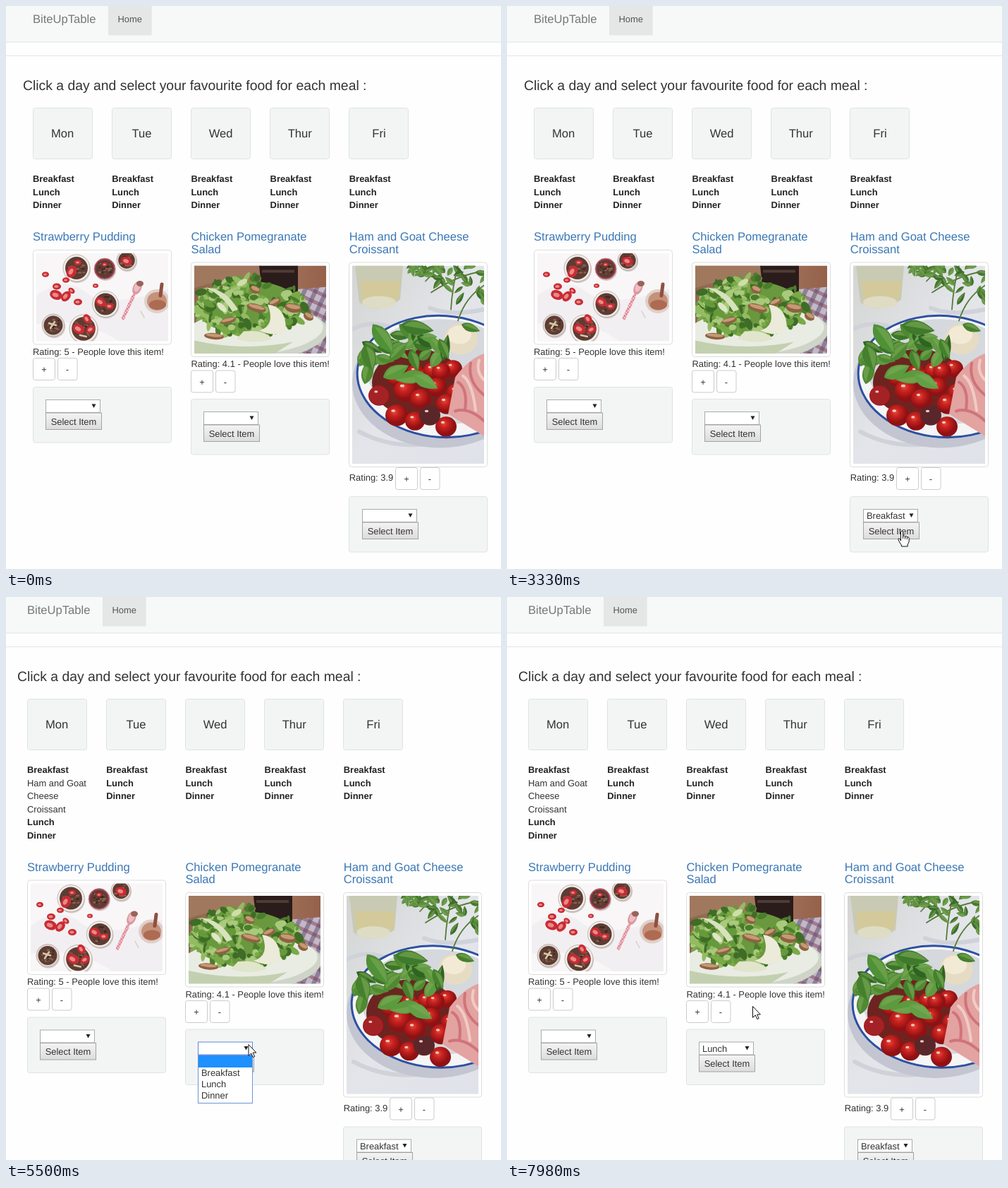
An HTML page that plays this animation: 702 by 797 pixels, repeating every 8000 ms.

```html
<!DOCTYPE html>
<html lang="en">
<head>
<meta charset="utf-8">
<title>Meal planner</title>
<style>
html, body { margin: 0; width: 100%; height: 100%; overflow: hidden; background: #fefefe; }
svg { display: block; width: 702px; height: 797px; }
text { font: 12.92px "Liberation Sans", Arial, sans-serif; fill: #333; text-rendering: geometricPrecision; }
.b { font-weight: bold; fill: #222; }
.h { font-size: 16.6px; }
.link { fill: #3b78b5; }
.mid { text-anchor: middle; }
.well { fill: #f3f5f5; stroke: #dfe3e3; }
.box { fill: #fff; stroke: #ccc; }
.frame { fill: #fff; stroke: #ddd; }
</style>
</head>
<body>
<svg id="stage" viewBox="0 0 702 797" xmlns="http://www.w3.org/2000/svg">
  <defs>
    <filter id="soft" x="0" y="0" width="1" height="1"><feGaussianBlur stdDeviation=".7"/></filter>
    <linearGradient id="btn" x2="0" y2="1"><stop stop-color="#f4f4f4"/><stop offset="1" stop-color="#dcdcdc"/></linearGradient>
    <linearGradient id="marble" x2="1" y2="1"><stop stop-color="#d3d4d2"/><stop offset=".5" stop-color="#e4e5ea"/><stop offset="1" stop-color="#e0e2ea"/></linearGradient>
    <linearGradient id="wood" x2="1"><stop stop-color="#8d6650"/><stop offset=".5" stop-color="#a87c62"/><stop offset="1" stop-color="#94604a"/></linearGradient>
    <radialGradient id="tomato" cx=".4" cy=".35"><stop stop-color="#e24a3a"/><stop offset=".4" stop-color="#c9221f"/><stop offset="1" stop-color="#8f1113"/></radialGradient>
    <pattern id="check" width="5" height="5" patternUnits="userSpaceOnUse"><path d="M0 0H5V5H0Z" fill="#f3c6cc"/><path d="M0 0H2.5V2.5H0ZM2.5 2.5H5V5H2.5Z" fill="#dd7d8b"/></pattern>
    <pattern id="plaid" width="14" height="14" patternUnits="userSpaceOnUse" patternTransform="rotate(25)"><path d="M0 0H14V14H0Z" fill="#c3b8c5"/><path d="M0 0H6V14H0Z" fill="#67587a" opacity=".6"/><path d="M0 0H14V5H0Z" fill="#7a3f58" opacity=".5"/></pattern>
  </defs>
  <g id="page"></g>
  <g id="pop"></g>
  <g id="arrow"><path d="M.5 .5V16.4L4.2 12.9L6.8 18.6L9.2 17.5L6.6 12H11.4Z" fill="#fff" stroke="#111"/></g>
  <g id="hand"><path d="M-1.5 14V1.6Q-1.5 .5 0 .5T1.6 1.6V7.2Q3.6 6.2 4.4 7.8Q6.4 7 7.2 8.7Q10 8 10.2 10.6V15Q9.6 17.6 8.2 19V22H-.6V20Q-3.2 17.4-4.9 12.8Q-5.4 10.8-4 10.6Q-2.6 11-1.5 14Z" fill="#fff" stroke="#111"/><path d="M1.6 7V11M4.5 8V11.5M7.3 9V12" stroke="#111"/></g>
</svg>
<script>
const $ = id => document.getElementById(id);
const LOOP = 8000, SHIFT = 3410, DX = -8, DY = 55.5;
const COL = 112.2, MEALS = ['', 'Breakfast', 'Lunch', 'Dinner'];

const text = (x, y, s, c = '') => `<text x="${x}" y="${y}" class="${c}">${s}</text>`;
const rect = (x, y, w, h, c, r = 0) => `<rect x="${x}" y="${y}" width="${w}" height="${h}" rx="${r}" class="${c}"/>`;
const fill = (x, y, w, h, f) => `<rect x="${x}" y="${y}" width="${w}" height="${h}" fill="${f}"/>`;
const oval = (x, y, rx, ry, f, a = 0, more = '') =>
  `<ellipse cx="${x}" cy="${y}" rx="${rx}" ry="${ry}" fill="${f}" transform="rotate(${a} ${x} ${y})" ${more}/>`;
const path = (d, f, more = '') => `<path d="${d}" fill="${f}" ${more}/>`;
const line = (d, c, w) => path(d, 'none', `stroke="${c}" stroke-width="${w}" stroke-linecap="round"`);

function random(seed) {
  return (a = 0, b = 1) => {
    seed = (seed * 16807) % 2147483647;
    return a + (b - a) * seed / 2147483647;
  };
}
const pick = (r, list) => list[Math.floor(r(0, list.length))];

function berry(x, y, r, a = 0) {
  return oval(x, y, r, r * .75, '#c92b34', a) + oval(x - r * .1, y, r * .5, r * .32, '#e88a84', a);
}

function pudding() {
  const r = random(11);
  const bowl = (x, y, R, rim) => {
    let s = oval(x + 1, y + 2, R, R, '#cfc7c6') + oval(x, y, R, R, rim, 0, 'stroke="#b5a59f" stroke-width=".8"');
    s += oval(x, y, R * .84, R * .84, '#5c3c33');
    for (let i = 0; i < 18; i++)
      s += oval(x + r(-.55, .55) * R, y + r(-.55, .55) * R, r(1, 3), 1.3, pick(r, ['#8c6350', '#40261f', '#74503f']));
    return s;
  };
  let s = fill(0, 0, 188, 127, '#f8f6f7');
  s += path('M0 60Q40 30 70 55T188 50V127H120Q70 90 0 100Z', '#f2eff2');
  s += bowl(57, 21, 19, '#f3ede9') + bowl(97, 22, 15, '#a83a4d') + bowl(128, 10, 14, '#e9dfd9');
  s += bowl(98, 72, 18.5, '#f3ede9') + bowl(24, 102, 16, '#e2d9d2') + bowl(67, 107, 20, '#f3ede9');
  s += berry(50, 26, 9, -60) + berry(128, 11, 8, 20) + berry(59, 13, 5) + berry(97, 16, 4);
  s += berry(91, 69, 8, 30) + berry(104, 75, 6) + berry(72, 93, 7, 60) + berry(60, 107, 9, 30) + berry(77, 108, 7, -30);
  s += berry(28, 59, 9, 20) + berry(42, 61, 8, -50) + berry(29, 47, 6) + berry(42, 38, 5) + berry(13, 30, 5);
  s += berry(59, 69, 6) + berry(84, 46, 4) + berry(50, 53, 5, 40);
  s += line('M18 99L28 102M20 106L26 97M62 116L71 118', '#d5c6a8', 2.5);
  s += line('M138 60L123 92', 'url(#check)', 4.5) + oval(143, 49, 6, 10, '#dd97a0', 24) + oval(143, 48, 4, 7, '#edbdc2', 24);
  s += oval(147, 43, 5, 4, '#98635a');
  s += oval(171, 68, 18, 17, '#dfd0cb') + oval(171, 68, 14, 13, '#c6917a') + oval(172, 73, 12, 7, '#ad6b51');
  s += line('M176 60L178 44', '#8e5041', 5) + line('M148 82L153 91', '#d6cfc3', 1.5);
  return s;
}

function salad() {
  const r = random(29);
  let s = fill(0, 0, 189, 127, 'url(#wood)');
  s += path('M0 0H95V35Q60 10 0 32Z', '#a0785e');
  s += path('M140 34L189 30V127H120Z', 'url(#plaid)');
  s += path('M92 0H147V38Q120 50 96 38Z', '#2a1c1b') + path('M96 6H142V10H96Z', '#503b35');
  s += oval(85, 98, 104, 38, '#ced5c8', -4) + oval(85, 93, 98, 33, '#e9ece2', -4);
  s += path('M0 106Q70 122 140 108L110 127H0Z', '#c3d0b0');
  const greens = ['#4b7e2b', '#659a3b', '#7aaa48', '#94bb62', '#3f6c26', '#a9c97c'];
  s += oval(78, 60, 74, 38, '#6a983f');
  for (let i = 0; i < 240; i++) {
    const a = r(0, 6.28), d = Math.sqrt(r());
    s += oval(78 + 80 * d * Math.cos(a), 58 + 42 * d * Math.sin(a), r(3, 10), r(2, 5.5), pick(r, greens), r(0, 180));
  }
  const meat = (x, y, w, h, a) => `<g transform="translate(${x} ${y}) rotate(${a})">` +
    oval(0, 0, w / 2, h / 2, '#8f6143') + oval(0, -h * .15, w * .42, h * .25, '#c49a73') + '</g>';
  s += meat(86, 34, 15, 11, 25) + meat(88, 60, 28, 11, 15) + meat(140, 60, 24, 13, 10) + meat(114, 52, 18, 10, -25);
  s += meat(48, 78, 22, 9, -15) + meat(28, 100, 28, 9, 5) + meat(162, 72, 15, 11, 30);
  s += path('M104 55Q129 58 130 88Q122 104 92 92Q116 85 104 55Z', '#ecead8');
  s += path('M70 93Q100 90 110 104Q88 112 60 104Z', '#e1e5cc') + path('M16 31Q44 32 62 62L54 65Q40 42 16 31Z', '#d8e2bd');
  s += oval(39, 59, 9, 4, '#dfe6c6', 45) + oval(68, 24, 8, 4, '#cfddaa', -30);
  return s;
}

function platter() {
  const r = random(47);
  const leaf = (x, y, w, h, a, c = '#45802c') => `<g transform="translate(${x} ${y}) rotate(${a})">` +
    path(`M${-w} 0Q${-w * .3} ${-h * 1.7} ${w} 0Q${-w * .3} ${h * 1.7} ${-w} 0Z`, c) +
    path(`M${-w * .8} 0Q${-w * .2} ${-h * 1.4} ${w * .9} 0Z`, '#79a854', 'opacity=".65"') + '</g>';
  const tom = (x, y, R, c = 'url(#tomato)') => oval(x, y, R, R * .95, c) + oval(x - R * .3, y - R * .4, R * .18, R * .11, '#f6c8bd');
  let s = fill(0, 0, 188, 282, 'url(#marble)');
  s += line('M0 90Q30 75 60 90M110 60Q140 72 187 62M10 235Q60 262 120 250', '#d0d2da', 6);
  s += path('M4 0H72L68 48Q38 72 10 52Z', '#c9cab4') + path('M12 22H68L66 46Q38 64 14 48Z', '#d3c99a') + oval(38, 52, 24, 9, '#dedcc4');
  s += oval(124, 166, 124, 92, '#c3c6d1') + oval(128, 157, 121, 86, '#f5f5f6', 4, 'stroke="#2d50a3" stroke-width="3"');
  s += oval(130, 150, 110, 74, '#d5d8dc', 4) + oval(92, 166, 64, 48, '#6d2420');
  const red = [[62, 160, 12], [90, 152, 13], [102, 160, 14], [114, 149, 13], [143, 146, 13], [126, 150, 13], [120, 172, 14],
    [38, 184, 15], [76, 177, 17], [97, 189, 15], [63, 212, 16], [89, 220, 14], [148, 180, 14], [134, 196, 15], [133, 228, 15]];
  for (const t of red) s += tom(...t);
  s += tom(110, 212, 15, '#59272a') + tom(38, 184, 14, '#a32225');
  s += path('M146 158Q165 132 188 124V242Q165 228 136 210Q142 180 146 158Z', '#e2a3a1');
  s += line('M150 165Q164 174 160 204M168 138Q163 165 188 184M146 206Q165 200 187 220', '#cf747b', 4);
  s += line('M157 156Q170 165 175 205M180 134Q175 150 187 162', '#f1cbc5', 4);
  s += oval(154, 104, 24, 22, '#e6dcc4') + oval(152, 98, 17, 13, '#f3ead6');
  const basil = ['#3c7527', '#4f8a33', '#2f6323', '#5f9a41'];
  for (let i = 0; i < 26; i++) {
    const u = i / 25;
    s += leaf(22 + 106 * u + r(-7, 7), 138 - 34 * Math.sin(u * 2.8) + r(-16, 18), r(10, 20), r(6, 10), r(-80, 80), pick(r, basil));
  }
  s += leaf(44, 104, 26, 13, 55, '#4f9137') + leaf(24, 130, 20, 12, 75) + leaf(92, 88, 24, 12, 10, '#3f7a2c');
  s += leaf(62, 150, 20, 11, -25, '#5c9a3e') + leaf(82, 158, 22, 11, 170, '#5c9a3e') + leaf(104, 164, 20, 11, 30, '#62a045') + leaf(88, 134, 16, 9, 70);
  s += leaf(168, 88, 14, 7, 20) + leaf(130, 118, 16, 8, 65);
  s += line('M187 8Q152 12 112 38M150 0Q142 30 140 62M187 28Q160 45 150 78M125 0L104 22', '#557c37', 1.8);
  for (let i = 0; i < 44; i++) {
    const x = r(82, 188), y = r(-4, 12 + (x - 82) * .5);
    s += leaf(x, y, r(6, 11), r(3, 5), r(0, 360), pick(r, ['#48792e', '#5f9140', '#3c6d2a']));
  }
  return s;
}

const plusMinus = (x, y) => rect(x, y, 31, 31, 'box', 3) + text(x + 15.5, y + 20.5, '+', 'mid') +
  rect(x + 35, y, 27.5, 31, 'box', 3) + text(x + 48.5, y + 20.5, '-', 'mid');

// Select position for each card, before the layout shift
const selects = [[56.5, 557.5], [280.5, 574.5], [505.5, 712.5]];

function card(n, title, photo, h, rating) {
  const x = 38 + n * 2 * COL, left = Math.floor(x) + .5, y = 332 + 17.5 * (title.length - 1);
  const [sx, sy] = selects[n], bottom = y + 13.5 + h;
  let s = title.map((l, i) => text(x, 332 + i * 17.5, l, 'h link')).join('');
  s += rect(left, y + 13.5, 196, h, 'frame', 4);
  s += `<svg x="${left + 4.5}" y="${y + 18}" width="187" height="${h - 9}"><g filter="url(#soft)">${photo}</g></svg>`;
  s += text(x, bottom + (n < 2 ? 14.5 : 19.5), rating);
  s += n < 2 ? plusMinus(left, bottom + 19.5) : plusMinus(left + 66, bottom + 1);
  s += rect(left, sy - 18, 196, 78.5, 'well', 3);
  s += `<rect id="sel${n}" x="${sx}" y="${sy}" width="77" height="18" fill="#fff" stroke="#a9a9a9"/>`;
  s += `<text id="val${n}" x="${sx + 4.5}" y="${sy + 13.5}"></text>`;
  s += path(`M${sx + 65} ${sy + 6}h6l-3 5.5z`, '#222');
  s += `<rect x="${sx}" y="${sy + 18.5}" width="79" height="23.5" fill="url(#btn)" stroke="#a2a2a2"/>`;
  return s + text(sx + 39.5, sy + 35, 'Select Item', 'mid');
}

function meals(x, lines) {
  return lines.map((l, i) => text(x, 249 + i * 18.5, l, MEALS.includes(l) ? 'b' : '')).join('');
}

function build() {
  let s = '';
  ['Mon', 'Tue', 'Wed', 'Thur', 'Fri'].forEach((d, i) => {
    const x = 38 + i * COL;
    s += rect(Math.floor(x) + .5, 144.5, 84, 72, 'well', 3) + text(x + 42.2, 185.5, d, 'h mid');
    if (i) s += meals(x, MEALS.slice(1));
  });
  s += `<g id="monEmpty">${meals(38, MEALS.slice(1))}</g>`;
  s += `<g id="monFull">${meals(38, ['Breakfast', 'Ham and Goat', 'Cheese', 'Croissant', 'Lunch', 'Dinner'])}</g>`;
  const cards = card(0, ['Strawberry Pudding'], pudding(), 133.5, 'Rating: 5 - People love this item!') +
    card(1, ['Chicken Pomegranate', 'Salad'], salad(), 133.5, 'Rating: 4.1 - People love this item!') +
    card(2, ['Ham and Goat Cheese', 'Croissant'], platter(), 289.5, 'Rating: 3.9');
  $('page').innerHTML = fill(0, 0, 702, 51, '#f7f9f9') + fill(0, 50.5, 702, 1, '#dfe4e4') + fill(0, 70, 702, 1, '#e4e7e7') +
    '<g id="body">' + fill(145, 0, 61.7, 41.5, '#e5e6e6') +
    `<text x="38" y="24" class="h" style="fill:#777">BiteUpTable</text><text x="158.5" y="23" style="fill:#555">Home</text>` +
    `<text x="24" y="119" style="font-size:19.38px">Click a day and select your favourite food for each meal :</text>` +
    s + `<g id="cards">${cards}</g></g>`;
}

// Pointer moves: start, end, steps, curve points
const moves = [
  [300, 930, 9, [[755, 725], [500, 640], [200, 260], [85, 168]]],
  [1390, 2012, 9, [[85, 168], [400, 480], [680, 640], [576, 720]]],
  [2240, 2550, 5, [[576, 720], [570, 735], [558, 750]]],
  [2950, 3100, 3, [[558, 750], [562, 756], [560, 743]]],
  [4110, 4730, 9, [[560, 743], [520, 785], [400, 700], [343, 629]]],
  [4960, 5030, 2, [[343, 629], [343.5, 633]]],
  [5580, 5900, 5, [[343.5, 633], [338, 655], [323, 676]]],
  [6280, 6440, 3, [[323, 676], [322, 682.5]]],
  [6670, 7370, 10, [[322, 682.5], [470, 560], [400, 300], [297, 183]]],
  [7830, 7980, 3, [[297, 183], [348, 579]]]
];

function curve(p, u) {
  while (p.length > 1)
    p = p.slice(1).map((q, i) => [p[i][0] + (q[0] - p[i][0]) * u, p[i][1] + (q[1] - p[i][1]) * u]);
  return p[0];
}

function pointer(t) {
  const m = moves.filter(v => v[0] <= t).pop();
  if (!m) return null;
  const [a, b, n, pts] = m;
  return curve(pts, Math.min(n, Math.floor((t - a) * (n - 1) / (b - a)) + 1) / n);
}

const lists = [
  { n: 2, open: 2090, close: 2720, value: 'Breakfast' },
  { n: 1, open: 5500, close: 6670, value: 'Lunch' }
];

function popup(x, y, row) {
  let s = `<rect x="${x}" y="${y + 18.5}" width="77" height="68" fill="#fff" stroke="#6f93d6"/>`;
  s += fill(x + .5, row ? y + 20 + 16 * row : y + 19, 76, row ? 16 : 17, '#1e90ff');
  MEALS.forEach((m, i) => {
    s += `<text x="${x + 4.5}" y="${y + 32 + 16 * i}"${i && i === row ? ' style="fill:#fff"' : ''}>${m}</text>`;
  });
  return s;
}

function draw(t) {
  const late = t >= SHIFT, dx = late ? DX : 0, dy = late ? DY : 0;
  $('body').setAttribute('transform', `translate(${dx} 0)`);
  $('cards').setAttribute('transform', `translate(0 ${dy})`);
  $('monEmpty').style.display = late ? 'none' : '';
  $('monFull').style.display = late ? '' : 'none';

  const p = pointer(t);
  let pop = '';
  for (const l of lists) {
    const x = selects[l.n][0] + dx, y = selects[l.n][1] + dy;
    const open = t >= l.open && t < l.close;
    let value = t >= l.close ? l.value : '';
    if (open) {
      const row = Math.max(0, Math.min(3, Math.floor((p[1] - y - 20) / 16)));
      value = MEALS[row];
      pop = popup(x, y, row);
    }
    $('val' + l.n).textContent = value;
    $('sel' + l.n).setAttribute('stroke', open ? '#5b8ad8' : '#a9a9a9');
  }
  $('pop').innerHTML = pop;

  let hand = t >= 3100 && t < SHIFT;
  if (p && p[1] > 144 && p[1] < 217) hand = (p[0] - 38 - dx) % COL < 85;
  for (const [id, on] of [['hand', hand], ['arrow', !hand]]) {
    $(id).style.display = p && on ? '' : 'none';
    if (p) $(id).setAttribute('transform', `translate(${p[0]} ${p[1]})`);
  }
}

build();
const start = performance.now();
function tick() {
  draw((performance.now() - start) % LOOP);
  requestAnimationFrame(tick);
}
tick();
</script>
</body>
</html>
```
